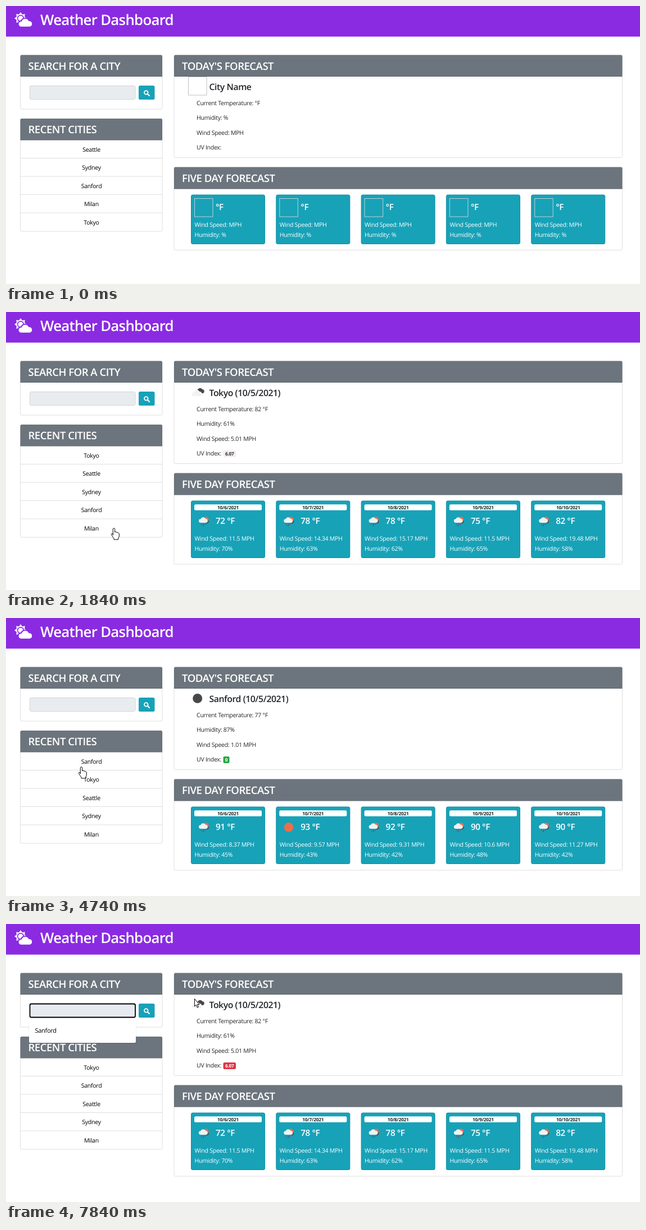
An HTML page that plays this animation: 1128x496 px, repeating every 8000 ms.

```html
<!DOCTYPE html>
<html lang="en">
<head>
<meta charset="utf-8">
<title>Weather Dashboard</title>
<style>
  html, body { margin: 0; width: 100%; height: 100%; overflow: hidden; background: #fff; }
  svg { display: block; width: 1128px; height: 496px; }
  text {
    font: 10.6px 'Open Sans', 'Noto Sans', sans-serif;
    letter-spacing: -.028em;
    text-rendering: geometricPrecision;
    fill: #212529;
    white-space: pre;
  }
  .title { font-size: 25.8px; font-weight: 600; fill: #fff; }
  .head { font-size: 18.6px; font-weight: 600; fill: #fff; }
  .city { font-size: 15.8px; font-weight: 600; }
  .temp { font-size: 15.3px; font-weight: 600; fill: #fff; }
  .white { fill: #fff; }
  .row { text-anchor: middle; fill: #000; }
  .date { font-size: 8.3px; font-weight: 700; text-anchor: middle; }
  .option { font-size: 11px; fill: #000; }
  .pointer { fill: #fff; stroke: #000; stroke-linejoin: round; }
</style>
</head>
<body>
<svg viewBox="0 0 1128 496">
  <defs>
    <path id="cloud" d="M4 12a4 4 0 0 1 0-8a5.5 5.5 0 0 1 10-.5a4.3 4.3 0 0 1 1 8.5z"/>
    <g id="rain">
      <circle cx="20.5" cy="14" r="5" fill="#ec6e4c"/>
      <path d="M21 20a3 3 0 0 0 4-4" fill="none" stroke="#48484a" stroke-width="1.4"/>
      <use href="#cloud" transform="translate(8 9.5) scale(.85)" fill="#f2f2f2"/>
      <path d="M13 21.5l-1 2M17 21.5l-2 4.5M20 21.5l-1 2" stroke="#48586a" stroke-width="1.2"/>
    </g>
    <circle id="sun" cx="16.7" cy="17" r="8.3" fill="#ec6e4c"/>
    <circle id="night" cx="16.7" cy="17.2" r="8.5" fill="#48484a"/>
    <g id="cloudy">
      <use href="#cloud" transform="translate(14 9) scale(.8)" fill="#48484a"/>
      <use href="#cloud" transform="translate(6 12.5)" fill="#f2f2f2" stroke="#fff"/>
    </g>
    <path id="hand" class="pointer" d="M-1.7 12V1.5a1.7 1.7 0 0 1 3.4 0V7a1.6 1.6 0 0 1 3 .5a1.5 1.5 0 0 1 2.6.8a1.4 1.4 0 0 1 2 1.2V13q0 3-1.7 5v2H0v-1.5Q-1 16.5-4.4 11.5q-.8-1.6.6-2.2q1.3-.3 2.1 1.7z"/>
    <path id="arrow" class="pointer" d="M.5.5V14L3.3 11.3L5.4 16L7.4 15.1L5.4 10.6H9z"/>
    <path id="ibeam" d="M-3-7.5H-.7L0-7L.7-7.5H3M0-7V7M-3 7.5H-.7L0 7L.7 7.5H3" fill="none" stroke="#000"/>
  </defs>
  <g id="base"></g>
  <g id="live"></g>
</svg>
<script>
const LOOP = 8000, TEAL = '#17a2b8', EDGE = 'rgba(0,0,0,.125)';
const base = document.getElementById('base'), live = document.getElementById('live');

const text = (x, y, s, cls = '', extra = '') => `<text x="${x}" y="${y}" class="${cls}" ${extra}>${s}</text>`;
const rect = (x, y, w, h, fill, extra = '') =>
  `<rect x="${x}" y="${y}" width="${w}" height="${h}" fill="${fill}" ${extra}/>`;
const use = (id, x, y) => `<use href="#${id}" x="${x}" y="${y}"/>`;
const outline = (x, y, w, h, fill = 'none') => rect(x, y, w, h, fill, 'rx="2.5" stroke="#000" stroke-width="1.8"');

const panel = (x, y, w, h, headH, title) =>
  `<path d="M${x} ${y + headH}v${2.5 - headH}q0-2.5 2.5-2.5h${w - 5}q2.5 0 2.5 2.5v${headH - 2.5}z" fill="#6c757d"/>` +
  rect(x, y + headH - 1, w, 1, EDGE) +
  rect(x, y, w, h, 'none', `rx="2.5" stroke="${EDGE}"`) +
  text(x + 14, y + 26.2, title, 'head');

const star = Array.from({ length: 16 }, (_, i) => {
  const a = i * Math.PI / 8, r = i % 2 ? 7.6 : 11;
  return (26 + r * Math.cos(a)).toFixed(1) + ',' + (22 + r * Math.sin(a)).toFixed(1);
}).join(' ');

base.innerHTML =
  rect(0, 0, 1128, 54.6, '#8a2be2') +
  `<polygon points="${star}" fill="#fff"/>
   <circle cx="26" cy="22" r="5.4" fill="#fff" stroke="#8a2be2" stroke-width="1.6"/>
   <use href="#cloud" transform="translate(21.5 21) scale(1.4)" fill="#fff" stroke="#8a2be2" stroke-width="1.5"/>` +
  text(61, 34, 'Weather Dashboard', 'title') +
  panel(25.5, 87.5, 252.5, 96.5, 38.5, 'SEARCH FOR A CITY') +
  rect(42.5, 142.5, 187.5, 24, '#e9ecef', 'rx="2.5" stroke="#ced4da"') +
  rect(236, 142, 28.5, 25, TEAL, 'rx="2.5"') +
  `<path d="M251.7 156.7l3.3 3.3" stroke="#fff" stroke-width="2.2" stroke-linecap="round"/>
   <circle cx="249.3" cy="154.4" r="3.3" fill="none" stroke="#fff" stroke-width="1.8"/>` +
  panel(25.5, 201, 252.5, 201, 38.5, 'RECENT CITIES') +
  [1, 2, 3, 4].map(i => rect(26, 238.5 + 32.5 * i, 252, 1, '#dfdfdf')).join('') +
  panel(299, 87.5, 797.5, 183, 38.5, "TODAY'S FORECAST");

const reports = {
  Tokyo: {
    icon: 'cloudy', temp: 82, hum: 61, wind: 5.01, uv: '6.07', rgb: [220, 53, 69],
    temps: [72, 78, 78, 75, 82], winds: [11.5, 14.34, 15.17, 11.5, 19.48], hums: [70, 63, 62, 65, 58]
  },
  Sanford: {
    icon: 'night', temp: 77, hum: 87, wind: 1.01, uv: '0', rgb: [40, 167, 69],
    temps: [91, 93, 92, 90, 90], winds: [8.37, 9.57, 9.31, 10.6, 11.27], hums: [45, 43, 42, 48, 42], sunny: 1
  }
};

// Each click: press, release, list reorder and data arrival times
const clicks = [
  { city: 'Tokyo', row: 4, x: 192, y: 386, down: 1310, up: 1440, list: 1510, data: 1840 },
  { city: 'Sanford', row: 3, x: 161, y: 352, down: 2970, up: 3100, list: 3170, data: 3240 },
  { city: 'Tokyo', row: 1, x: 129, y: 277, down: 5070, up: 5270, list: 5270, data: 5340 },
  { x: 110, y: 150, down: 7100, up: 7230 }
];

// Cursor moves: start, end, then evenly timed x,y stops
const moves = [
  [230, 1050, 844, 484, 760, 472, 640, 456, 500, 440, 375, 412, 290, 392,
    240, 376, 214, 368, 204, 373, 199, 380, 194, 384, 192, 386],
  [1840, 2440, 192, 386, 191, 385, 189, 382, 185, 376, 179, 369, 173, 363, 168, 358, 164, 354, 162, 352, 161, 352],
  [4030, 4810, 160, 349, 159, 343, 157, 334, 154, 322, 151, 309, 147, 295,
    143, 282, 140, 271, 138, 264, 136, 263, 134, 266, 129, 277],
  [5750, 6430, 128, 262, 127, 235, 125, 208, 121, 188, 116, 170, 112, 157, 109, 148, 108, 145, 109, 148, 110, 150],
  [7300, 7840, 116, 150, 140, 148, 180, 146, 230, 144, 275, 141, 305, 138, 325, 135, 335, 133]
];

function today(r, city, age) {
  const lines = ['Current Temperature: ', 'Humidity: ', 'Wind Speed: ', 'UV Index:'];
  const vals = r ? [r.temp + ' °F', r.hum + '%', r.wind + ' MPH', ''] : ['°F', '%', 'MPH', ''];
  let s = lines.map((l, i) => text(339, 177 + 26.4 * i, l + vals[i])).join('');
  if (!r) return s + rect(324.5, 126.5, 32.5, 32.5, 'none', 'stroke="#c0c0c0"') + text(361.5, 149.5, 'City Name', 'city');
  const p = Math.min(1, .03 + age / 130), mix = (a, b) => Math.round(a + (b - a) * p);
  const bg = r.rgb.map(c => mix(244, c)), ink = [33, 37, 41].map(c => mix(c, 255));
  const w = r.uv.length > 1 ? 22.5 : 11;
  return s + use(r.icon, 324, 126.3) + text(361.5, 149.5, city + ' (10/5/2021)', 'city') +
    rect(386.5, 247, w, 12, `rgb(${bg})`, 'rx="2.5"') +
    text(386.5 + w / 2, 256, r.uv, 'date', `style="fill:rgb(${ink})"`);
}

function day(r, i) {
  const x = 329.5 + 151.3 * i, dy = r ? 14 : 0;
  return rect(x, 337, 131, 87.5 + dy, TEAL, 'rx="2.5" stroke="#158ea2"') +
    (r ? rect(x + 5.5, 343.3, 120, 10.5, '#fff', 'rx="2.5"') +
         text(x + 65.5, 351.6, `10/${6 + i}/2021`, 'date') +
         use(r.sunny === i ? 'sun' : 'rain', x + 5.5, 356.3)
       : rect(x + 6, 343.5, 32.5, 32.5, 'none', 'stroke="#c0d0d4"')) +
    text(x + 43.5, 363.8 + dy, (r ? r.temps[i] + ' ' : '') + '°F', 'temp') +
    text(x + 6, 394 + dy, `Wind Speed: ${r ? r.winds[i] + ' ' : ''}MPH`, 'white') +
    text(x + 6, 412 + dy, `Humidity: ${r ? r.hums[i] : ''}${r ? '' : ' '}%`.replace(/ +/g, ' '), 'white');
}

function cursor(t) {
  const m = moves.filter(m => t >= m[0]).pop();
  if (!m) return '';
  const [start, end, ...pts] = m, last = pts.length / 2 - 1;
  const k = Math.min(last, Math.floor((t - start) / (end - start) * last + .2));
  const x = pts[2 * k], y = pts[2 * k + 1];
  const over = (l, top, r, b) => x >= l && x <= r && y >= top && y <= b;
  const kind = over(26, 239, 278, 402) || over(236, 142, 264, 167) ? 'hand'
    : over(42, 142, 230, 167) || over(39, 203, 165, 234) ? 'ibeam' : 'arrow';
  return use(kind, x, y);
}

function scene(t) {
  let cities = ['Seattle', 'Sydney', 'Sanford', 'Milan', 'Tokyo'], shown, s = '', glow = '';
  for (const c of clicks) {
    if (t >= c.list) cities = [c.city, ...cities.filter(n => n !== c.city)];
    if (t >= c.data) shown = c;
    if (t >= c.down && t < c.list) s += outline(26, 239 + 32.5 * c.row, 251.5, 32.5);
    if (t >= c.down && t < c.up) glow = `<circle cx="${c.x}" cy="${c.y}" r="10" fill="#fff23c" opacity=".75"/>`;
  }
  const r = shown && reports[shown.city];
  s += cities.map((c, i) => text(152, 260 + 32.4 * i, c, 'row')).join('');
  s += today(r, shown && shown.city, shown && t - shown.data);
  s += panel(299, 287.5, 797.5, r ? 162.5 : 148, 39, 'FIVE DAY FORECAST');
  for (let i = 0; i < 5; i++) s += day(r, i);
  if (t >= 7100) s += outline(42.5, 142.5, 187.5, 24, '#e8eaf2');
  if (t >= 7170) {
    s += rect(40.5, 172, 191, 42, 'rgba(0,0,0,.08)', 'rx="3"') +
      rect(41, 169, 190, 43, '#fff', 'rx="2.5"') + text(51.5, 194, 'Sanford', 'option');
  }
  return s + glow + cursor(t);
}

let drawn = '';
function frame(now) {
  const next = scene(now % LOOP);
  if (next !== drawn) live.innerHTML = drawn = next;
  requestAnimationFrame(frame);
}
frame(0);
</script>
</body>
</html>
```
